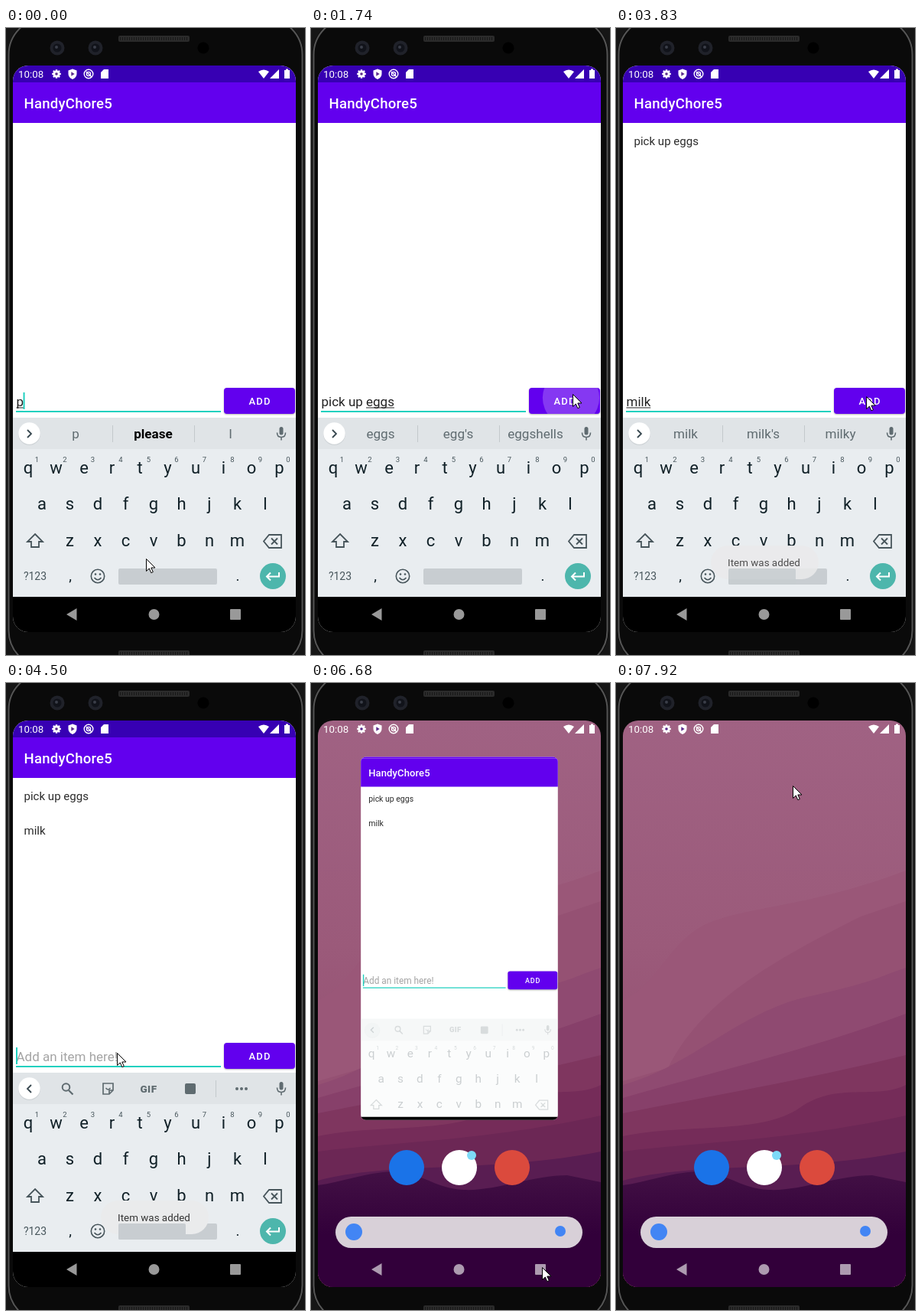
An HTML page with a canvas that plays this animation: 391 by 819 pixels, repeating every 8000 ms.

```html
<!DOCTYPE html>
<html lang="en">
<head>
<meta charset="utf-8">
<style>
html, body { margin: 0; height: 100%; overflow: hidden; background: #0a0a0a; }
canvas { display: block; width: 391px; height: 819px; }
</style>
</head>
<body>
<canvas id="stage" width="391" height="819"></canvas>
<script>
const c = document.getElementById('stage').getContext('2d');
const LOOP = 8000, TAU = Math.PI * 2;

// [time, text, suggestions, middle suggestion is bold]; the last word is underlined
const typing = [
  [0, 'p', ['p', 'please', 'I'], true],
  [130, 'pi', ['pi', 'pick', 'pic']],
  [270, 'pic', ['pic', 'pick', 'pics']],
  [410, 'pick ', ['up', 'it', 'the']],
  [550, 'pick up', ['up', 'upon', 'ups']],
  [690, 'pick up e', ['e', 'even', 'every']],
  [830, 'pick up egg', ['egg', 'eggs', "egg's"]],
  [970, 'pick up eggs', ['eggs', "egg's", 'eggshells']],
  [1870, ''],
  [2800, 'm', ['m', 'my', 'maybe']],
  [2940, 'mi', ['mi', 'miss', 'mind']],
  [3080, 'mil', ['mil', 'milk', 'mile']],
  [3220, 'milk', ['milk', "milk's", 'milky']],
  [4160, '']
];
const items = [[1870, 'pick up eggs'], [4160, 'milk']];
const presses = [[1600, 1870], [3900, 4160]];
const toasts = [[1960, 3960], [4250, 6150]];
const mouse = [
  [0, 183, 693], [1120, 183, 693], [1600, 342, 478], [1900, 342, 478], [2250, 210, 490],
  [3570, 210, 490], [3900, 342, 480], [4180, 342, 480], [4500, 145, 483], [4680, 145, 483],
  [5100, 180, 396], [5750, 262, 770], [6050, 302, 763], [6820, 302, 763], [7080, 210, 560],
  [7330, 76, 407], [7390, 76, 407], [7500, 160, 400], [7750, 231, 134]
];
const cardMove = [[0, 0, 0], [7200, 0, 0], [7360, -9, 0], [7480, -9, 0], [7700, 0, -240], [7860, 0, -560]];

const clamp = x => Math.max(0, Math.min(1, x));

function tween(keys, t) {
  const i = keys.findLastIndex(k => k[0] <= t);
  const a = keys[i], b = keys[i + 1];
  if (!b) return a.slice(1);
  const p = (t - a[0]) / (b[0] - a[0]), e = p * p * (3 - 2 * p);
  return a.slice(1).map((v, j) => v + (b[j + 1] - v) * e);
}

function rect(x, y, w, h, color, r = 0) {
  c.fillStyle = color;
  c.beginPath();
  c.roundRect(x, y, w, h, r);
  c.fill();
}
function disc(x, y, r, color) {
  c.fillStyle = color;
  c.beginPath();
  c.arc(x, y, r, 0, TAU);
  c.fill();
}
function ring(x, y, r, color, width = 1.6) {
  c.strokeStyle = color;
  c.lineWidth = width;
  c.beginPath();
  c.arc(x, y, r, 0, TAU);
  c.stroke();
}
function fillPath(d, color) {
  c.fillStyle = color;
  c.fill(new Path2D(d));
}
function line(d, color, width = 1.8) {
  c.strokeStyle = color;
  c.lineWidth = width;
  c.stroke(new Path2D(d));
}
function text(s, x, y, size, color, align = 'left', weight = 400, gap = 0) {
  c.font = `${weight} ${size}px Roboto, sans-serif`;
  c.letterSpacing = gap + 'px';
  c.textAlign = align;
  c.fillStyle = color;
  c.fillText(s, x, y);
  const w = c.measureText(s).width;
  c.letterSpacing = '0px';
  return w;
}
function scoped(draw) {
  c.save();
  draw();
  c.restore();
}
function clip(x, y, w, h, r = 0) {
  c.beginPath();
  c.roundRect(x, y, w, h, r);
  c.clip();
}

function phone() {
  rect(0, 0, 391, 819, '#161616');
  rect(2, -14, 387, 850, '#0a0a0a', 48);
  c.lineWidth = 2;
  c.strokeStyle = '#555';
  c.beginPath();
  c.roundRect(3.5, -13, 384, 848, 48);
  c.stroke();
  for (const y of [10, 813]) {
    rect(147, y, 93, 8, '#2b2b2b', 2);
    for (let x = 149; x < 239; x += 3) rect(x, y + 2, 1, 4, '#171717');
  }
  for (const x of [67, 117]) {
    disc(x, 26, 9.5, '#20222a');
    disc(x, 26, 5.5, '#11131a');
    disc(x - 1, 25, 2, '#3a3e48');
  }
  disc(258, 26, 7.5, '#000');
}

function wallpaper() {
  const g = c.createLinearGradient(0, 49, 0, 789);
  g.addColorStop(0, '#a06283');
  g.addColorStop(.4, '#9b5a7a');
  g.addColorStop(1, '#8b4468');
  rect(9, 49, 370, 740, g);
  const hills = [
    ['M9 415C60 390 70 330 130 310S260 290 379 245', '#9a5778'],
    ['M9 520L68 503C110 420 190 370 320 305L379 285', '#955173'],
    ['M9 525C100 500 160 430 250 410S340 385 379 372', '#8f4a71'],
    ['M9 542C120 510 250 480 379 432', '#87406a'],
    ['M9 562C120 540 240 520 379 486', '#7f365f'],
    ['M9 592C90 575 190 590 240 555S340 545 379 525', '#752c59'],
    ['M9 612C100 600 230 598 379 565', '#6c2755'],
    ['M9 650C100 625 240 640 379 612', '#591d52']
  ];
  for (const [d, color] of hills) fillPath(d + 'V789H9Z', color);
  const m = c.createLinearGradient(0, 640, 0, 720);
  m.addColorStop(0, '#421044');
  m.addColorStop(1, '#32003a');
  fillPath('M9 656C40 652 70 640 105 638S160 660 200 662S290 643 335 643L379 652V789H9Z', m);
}

function dock() {
  disc(125, 633, 23, '#1a73e8');
  disc(194, 633, 23, '#fff');
  disc(210, 617, 6, '#7ddaf8');
  disc(263, 633, 23, '#db4a3d');
  rect(32, 697, 323, 41, '#d8d0d8', 20.5);
  disc(56, 717, 11, '#4285f4');
  disc(326, 716, 7, '#4285f4');
}

function statusIcons() {
  const w = '#fff';
  text('10:08', 16, 65, 13.3, w);
  for (let i = 0; i < 8; i++) {
    const a = i * TAU / 8;
    line(`M66 60l${Math.cos(a) * 5.8} ${Math.sin(a) * 5.8}`, w, 2.4);
  }
  ring(66, 60, 3.2, w, 2.6);
  disc(66, 60, 1.8, '#5b2a8c');
  fillPath('M87 53.5l5.5 2v4.5q0 4.5-5.5 7q-5.5-2.5-5.5-7v-4.5z', w);
  fillPath('M85.3 57.3l4.4 2.7l-4.4 2.7z', '#5b2a8c');
  ring(108, 60, 5.8, w, 1.4);
  ring(108, 60, 2.6, w, 1.4);
  line('M105 57l7 7', w, 1.4);
  fillPath('M128 54h6v12h-10v-8z', w);
  fillPath('M330 57q7-5 14 0l-7 9z', w);
  fillPath('M357 54v12h-12z', w);
  fillPath('M366 53.5h3v1.5h2v11h-7v-11h2z', w);
}

function navIcons(color) {
  fillPath('M79 766l13.5-8v16z', color);
  disc(193.5, 766, 7, color);
  rect(293, 759, 14, 14, color, 1);
}

function suggestionStrip(entry) {
  const ink = '#5f6b70', [, , words, bold] = entry;
  rect(9, 509, 370, 41, '#e0e4e7');
  disc(30.5, 530.5, 14.5, '#cfd4d7');
  disc(30.5, 529.5, 14.2, '#fff');
  line(words ? 'M28 525l5 5l-5 5' : 'M33 525l-5 5l5 5', '#37474f');
  if (words) {
    words.forEach((s, i) => {
      const strong = bold && i === 1;
      text(s, [91, 192.5, 293.5][i], 536, 17.1, strong ? '#000' : ink, 'center', strong ? 700 : 400);
    });
    for (const x of [139, 246]) rect(x, 519, 1, 22, '#c3c9cc');
  } else {
    ring(78.5, 528, 4.8, ink, 2);
    line('M82 532l5.5 5.5', ink, 2.2);
    line('M127 523h13v9l-5 5h-8zM140 532h-5v5', ink, 1.7);
    line('M130.5 529q3 4 6 0', ink, 1.4);
    text('GIF', 186.5, 534.5, 13.5, ink, 'center', 900, .5);
    rect(234, 523, 14, 14, ink, 2);
    rect(274, 519, 1, 22, '#c3c9cc');
    for (const x of [302, 308, 314]) disc(x, 530, 2, ink);
  }
  rect(357.5, 521, 5, 10.5, ink, 2.5);
  line('M354.5 528.5q0 6 5.5 6t5.5-6M360 534.5v4', ink, 1.6);
}

function keyboard(entry) {
  const ink = '#102027', soft = '#47555b';
  rect(9, 509, 370, 234, '#e9edf0');
  suggestionStrip(entry);
  ['qwertyuiop', 'asdfghjkl', 'zxcvbnm'].forEach((row, r) => {
    [...row].forEach((ch, i) => {
      const x = [29, 47, 83.5][r] + i * 36.5;
      text(ch, x, 581.5 + r * 47.5, 22, ink, 'center');
      if (!r) text((i + 1) % 10, x + 11.5, 566.5, 9.5, soft, 'center');
    });
  });
  line('M38 661l10 10h-5v7h-10v-7h-5z', soft);
  line('M344 662h16v17h-16l-7-8.5zM347 666.5l8 8M355 666.5l-8 8', soft);
  text('?123', 38, 721, 14, soft, 'center');
  text(',', 84, 722, 19, ink, 'center');
  ring(120, 716, 8.7, soft);
  disc(117, 713.5, 1.3, soft);
  disc(123, 713.5, 1.3, soft);
  line('M115.5 718q4.5 5.5 9 0', soft, 1.6);
  rect(147, 706, 129, 21, '#c8cdd1', 2);
  text('.', 303, 722, 19, ink, 'center');
  disc(349, 716, 17, '#4db6ac');
  line('M357 711v5.5h-15M346 711.5l-5 5l5 5', '#fff', 2);
}

function toast(t) {
  for (const [from, to] of toasts) {
    const a = Math.min(clamp((t - from) / 150), clamp((to - t) / 150));
    if (!a) continue;
    c.globalAlpha = a;
    rect(124, 676, 141, 44, '#eaebec', 22);
    rect(147, 706, 88, 21, '#c8cdd1', 2);
    text('Item was added', 193.5, 703, 13.4, '#333', 'center');
    c.globalAlpha = 1;
  }
}

function addButton(t) {
  scoped(() => {
    c.shadowColor = 'rgba(0,0,0,.3)';
    c.shadowBlur = 2;
    c.shadowOffsetY = 1;
    rect(285, 470, 93, 34, '#6200ee', 4);
  });
  text('ADD', 332, 492, 13, '#fff', 'center', 500, 1.16);
  for (const [down, up] of presses) {
    if (t < down || t > up + 250) continue;
    scoped(() => {
      clip(285, 470, 93, 34, 4);
      disc(340, 483, 16 + (t - down) * .15, `rgba(255,255,255,${.22 * (1 - clamp((t - up) / 250))})`);
    });
  }
}

function inputField(t, entry) {
  const [since, value] = entry, teal = '#1fd0bf';
  rect(13, 500, 268, 2, teal);
  let end = 13.5;
  if (value) {
    const start = value.lastIndexOf(' ') + 1;
    const before = text(value.slice(0, start), 13.5, 494, 17, '#222');
    const word = text(value.slice(start), 13.5 + before, 494, 17, '#222');
    if (word) rect(13.5 + before, 495.5, word, 1, '#222');
    end += before + word;
  } else {
    text('Add an item here!', 13.5, 494, 17, '#a4a4a4');
  }
  const blink = Math.min(t, 6300) - since;
  if (Math.floor(blink / 500) % 2 === 0) rect(end - .5, 476, 2, 22, teal);
}

function app(t, p) {
  const entry = typing.findLast(e => e[0] <= t);
  rect(9, 49, 370, 740, '#fff');
  rect(9, 49, 370, 22, p ? '#6200ee' : '#3700b3');
  rect(9, 71, 370, 53, '#6200ee');
  text('HandyChore5', 23.5, 105, 18.6, '#fff', 'left', 500, .22);
  items.forEach(([from, s], i) => {
    if (t >= from) text(s, 23.5, 152.5 + i * 45, 15.05, '#2b2b2b');
  });
  inputField(t, entry);
  addButton(t);
  if (p < 1) scoped(() => {
    clip(9, 500, 370, 243);
    c.globalAlpha = (1 - p) ** 2.3;
    c.translate(0, 100 * p);
    keyboard(entry);
  });
  toast(t);
  rect(9, 743, 370, 46, '#000');
}

// The app window shrinks into a card, which is then swiped away.
function card(t, p) {
  const k = 1 - (1 - p) ** 3, scale = 1 - .346 * k;
  const [dx, dy] = tween(cardMove, t);
  if (dy < -540) return;
  const top = 49 + 22 * k, bottom = 789 - 46 * k;
  scoped(() => {
    c.translate(194 + dx, 98 + 22 * k + dy);
    c.scale(scale, scale);
    c.translate(-194, -98);
    clip(9, top, 370, bottom - top, 12 * k * k);
    app(t, p);
  });
  const a = clamp((t - 6850) / 200);
  c.globalAlpha = a;
  if (a) disc(194 + dx - .5, 102 + dy, 20.5 * a, '#1a6fd6');
  c.globalAlpha = 1;
}

function pointer(t) {
  const [x, y] = tween(mouse, t);
  scoped(() => {
    c.translate(x, y);
    const arrow = 'M.5 .5V16.5L4.3 13L6.8 18.7L9.3 17.6L6.8 12H12Z';
    fillPath(arrow, '#fff');
    line(arrow, '#000', 1);
  });
}

function draw(t) {
  const p = clamp((t - 6400) / 560);
  phone();
  scoped(() => {
    clip(9, 49, 370, 740, 20);
    if (p) {
      wallpaper();
      dock();
      card(t, p);
    } else app(t, 0);
    statusIcons();
    navIcons(p ? '#ad9bb0' : '#999');
  });
  pointer(t);
}

const start = performance.now();
function frame(now) {
  draw(Math.max(0, now - start) % LOOP);
  requestAnimationFrame(frame);
}
draw(0);
requestAnimationFrame(frame);
</script>
</body>
</html>
```
